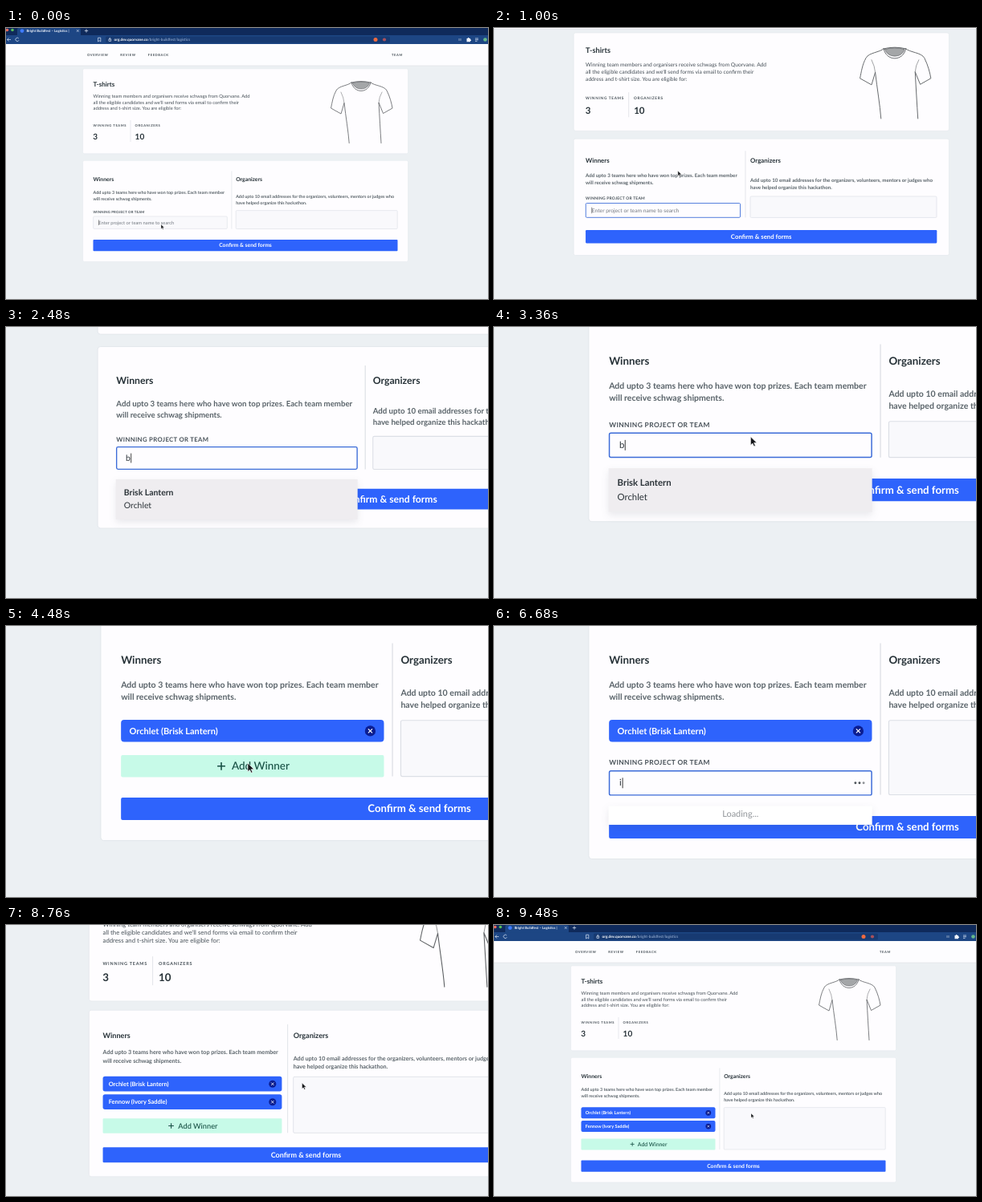
Write an HTML page that moves like this. It is 600x338 px and loops after 9520 ms.

```html
<!DOCTYPE html>
<html lang="en">
<head>
<meta charset="utf-8">
<title>Logistics form</title>
<style>
  html, body { margin: 0; width: 100%; height: 100%; overflow: hidden; background: #ecf0f3; }
  svg { display: block; width: 100vw; height: 100vh; }
  text { font-family: Lato, "Open Sans", sans-serif; font-size: 5.8px; fill: #465057; text-rendering: geometricPrecision; white-space: pre; }
  .title { font-size: 8px; font-weight: 700; fill: #273238; }
  .head { font-size: 6.8px; font-weight: 700; fill: #273238; }
  .count { font-size: 10px; font-weight: 700; fill: #273238; }
  .caps { font-size: 4.1px; font-weight: 700; letter-spacing: .6px; }
  .label { font-size: 4.3px; font-weight: 700; letter-spacing: .19px; }
  .note { font-size: 5.38px; font-weight: 700; fill: #596369; }
  .hint { fill: #737980; }
  .typed { fill: #2b3338; }
  .strong { font-weight: 700; fill: #2b3338; }
  .pill { font-size: 5.6px; font-weight: 700; fill: #fff; }
  .action { font-size: 6.75px; font-weight: 700; fill: #fff; text-anchor: middle; }
  .add { font-size: 6.9px; font-weight: 500; fill: #164f43; }
  .tab { font-size: 4.3px; font-weight: 700; fill: #eef3fb; }
  .url { font-size: 4.7px; fill: #a9bedd; }
  .url tspan { fill: #fff; font-weight: 700; }
  .card { fill: #fefdff; stroke: #e1e6ea; stroke-width: .5; }
  .rule { stroke: #dadde2; stroke-width: .6; }
  .blue { fill: #2e63fc; }
  .field { fill: #f9f9fc; stroke: #dcdfe6; stroke-width: .6; }
  .field.focus { fill: #fefdff; stroke: #3b6bd8; stroke-width: .75; }
  .panel { filter: drop-shadow(0 2px 2.5px rgba(40, 50, 70, .1)); }
  .icon { fill: none; stroke: #dfe9f8; stroke-width: .7; }
  .shirt { fill: #fefdff; stroke: #5c5f62; stroke-width: .8; stroke-linejoin: round; stroke-linecap: round; }
</style>
</head>
<body>
<svg viewBox="0 0 600 338" preserveAspectRatio="none">
<g id="camera">
  <rect width="600" height="345" fill="#ecf0f3"/>

  <!-- Browser bar -->
  <rect width="600" height="10" fill="#0f2a5b"/>
  <rect y="9" width="600" height="11" fill="#1d4684"/>
  <path d="M14 9.5V2q0-2 2-2H91q2 0 2 2V9.5Z" fill="#1d4684"/>
  <circle cx="1.5" cy="2.5" r="1.8" fill="#e8695c"/>
  <circle cx="8" cy="2.5" r="1.8" fill="#56c05a"/>
  <circle cx="20" cy="3.6" r="2.4" fill="#3f7cff"/>
  <text class="tab" x="25.5" y="5.1">Bright Buildfest – Logistics |</text>
  <path class="icon" d="M88 2.2l2.6 2.6m0-2.6l-2.6 2.6M97.8 3.5h4.4m-2.2-2.2v4.4"/>
  <rect x="124" y="10.5" width="354" height="8" rx="1.5" fill="#173a72"/>
  <path class="icon" d="M6 14.5H1.5l2-2m-2 2l2 2M15.8 13a2.2 2.2 0 1 0 .3 2.2M114.6 12.2h3.2v4.8l-1.6-1.3-1.6 1.3Z"/>
  <path class="icon" d="M128 14h2.6v2.4H128Zm.5 0v-1q.8-1.4 1.6 0v1"/>
  <text class="url" x="134.5" y="16.1"><tspan>org.dev.quorvane.co</tspan>/bright-buildfest/logistics</text>
  <circle cx="460" cy="14.5" r="2.5" fill="#ef6a3f"/>
  <circle cx="471" cy="14.5" r="2.1" fill="#a8505c"/>
  <rect x="563" y="13" width="4" height="3" fill="#52709f"/>
  <path d="M573.5 13h1.4v-1h1.5v1h1.6v1.5h1V16h-1v1.2h-4.5Z" fill="#eef3fb"/>
  <path class="icon" d="M584 13h4m-4 1.7h4m-4 1.7h2.5"/>
  <circle cx="596.5" cy="14.5" r="2.3" fill="#66ba8b"/>

  <!-- Navigation -->
  <rect y="20" width="600" height="27" fill="#fdfdff"/>
  <path class="rule" d="M0 47H600"/>
  <text class="caps" x="101" y="35.4">OVERVIEW</text>
  <text class="caps" x="142.3" y="35.4">REVIEW</text>
  <text class="caps" x="176.8" y="35.4">FEEDBACK</text>
  <text class="caps" x="480" y="35.4">TEAM</text>

  <!-- Summary card -->
  <rect class="card" x="95.6" y="50.8" width="405" height="106" rx="2"/>
  <text class="title" x="108.5" y="72.7">T-shirts</text>
  <text x="108.5" y="87">Winning team members and organisers receive schwags from Quorvane. Add</text>
  <text x="108.5" y="94.7">all the eligible candidates and we'll send forms via email to confirm their</text>
  <text x="108.5" y="102.4">address and t-shirt size. You are eligible for:</text>
  <text class="caps" x="108.5" y="123.1">WINNING TEAMS</text>
  <text class="caps" x="160.5" y="123.1">ORGANIZERS</text>
  <text class="count" x="108.3" y="138.5">3</text>
  <text class="count" x="160.6" y="138.5">10</text>
  <path class="rule" d="M155 115V142"/>
  <g class="shirt">
    <path d="M430 68C426 72 414 72 411 78C407 85 406 93 404.5 100L417 107L421 93.5C423 111 426 128 427.2 143.5M454 68C458 72 471 72 474 78C478 86 480 94 481 100L469.5 106.5L464 93C465 111 466 128 467 143.5"/>
    <path d="M417 80Q420.5 87 421 93.5M468 80Q464.5 86 464 93" stroke-width=".5" fill="none"/>
    <path d="M430 68C433 82 451 82 454 68"/>
    <path d="M431.5 68.6Q442 65.5 452.5 68.6C450 78.5 434 78.5 431.5 68.6Z" fill="#a4a6a8" stroke-width=".6"/>
    <path d="M430 68Q442 65 454 68" fill="none"/>
  </g>

  <!-- Form card -->
  <rect class="card" id="formCard" x="95.6" y="165.3" width="405" rx="2"/>
  <path class="rule" id="divider"/>
  <text class="head" x="108.5" y="191.4">Winners</text>
  <text class="note" x="108.5" y="206.7">Add upto 3 teams here who have won top prizes. Each team member</text>
  <text class="note" x="108.5" y="214.5">will receive schwag shipments.</text>
  <text class="head" x="286.2" y="191.4">Organizers</text>
  <text class="note" x="286.2" y="212">Add upto 10 email addresses for the organizers, volunteers, mentors or judges who</text>
  <text class="note" x="286.2" y="219.8">have helped organize this hackathon.</text>
  <rect class="field" id="emails" x="286.2" y="227.6" width="201" rx="1"/>

  <g id="confirm">
    <rect class="blue" x="108.5" width="379" height="14.3" rx="1"/>
    <text class="action" x="298" y="9.4">Confirm &amp; send forms</text>
  </g>

  <g id="pill1"></g>
  <g id="pill2" transform="translate(0 16.8)"></g>

  <g id="add">
    <rect x="108.5" y="249.7" width="167" height="14" rx="1" fill="#c7fae8"/>
    <path d="M169.7 256.7h5m-2.5-2.5v5" stroke="#164f43" stroke-width=".8"/>
    <text class="add" x="178.8" y="259">Add Winner</text>
  </g>

  <g id="search">
    <text class="label" x="108.5" y="231.1">WINNING PROJECT OR TEAM</text>
    <rect class="field" id="input" x="108.7" y="235" width="166.6" height="15.4" rx="1"/>
    <text class="hint" id="hint" x="115.2" y="244.6">Enter project or team name to search</text>
    <text class="typed" id="typed" x="115" y="244.6"></text>
    <rect id="caret" y="239.4" width=".5" height="6.6" fill="#333"/>
    <g id="loading">
      <rect class="panel" x="108.2" y="257.4" width="167.4" height="11.9" fill="#fff"/>
      <text x="192" y="264.2" text-anchor="middle" style="fill:#92969a;font-size:5.6px">Loading...</text>
      <g id="dots" fill="#444a50">
        <circle cx="265" cy="242.7" r=".75"/><circle cx="267.6" cy="242.7" r=".75"/><circle cx="270.2" cy="242.7" r=".75"/>
      </g>
    </g>
    <g id="result">
      <rect class="panel" x="108.2" y="257.4" width="167.4" height="27.8" fill="#efedf0"/>
      <text class="strong" id="team" x="113.8" y="268.6"></text>
      <text class="typed" id="project" x="113.8" y="277.5"></text>
    </g>
  </g>

  <path id="cursor" d="M0 0V5.4L1.3 4.3L2.2 6.2L3.1 5.8L2.2 3.9H4Z" fill="#15171a" stroke="#fff" stroke-width=".35"/>
</g>
</svg>
<script>
const LOOP = 9520;
const FOCUS = { x: 72.4, y: 342 };
const winners = [
  { team: "Brisk Lantern", project: "Orchlet", key: "b", typed: 1900, found: 2340, picked: 4040 },
  { team: "Ivory Saddle", project: "Fennow", key: "i", typed: 6600, found: 7040, picked: 7740 }
];
const ADD_CLICK = 4960;
const cursorPath = [
  [0, 193, 245], [250, 193, 245], [900, 208, 200], [3100, 208, 200], [3600, 190, 270],
  [4040, 190, 270], [4400, 189, 254.8], [5100, 189, 254.8], [5700, 186, 266],
  [7150, 186, 266], [7500, 190, 293], [7760, 190, 293], [8680, 294.3, 233.4],
  [8800, 294.3, 233.4], [9480, 320, 235]
];

const $ = id => document.getElementById(id);
const show = (id, on) => $(id).style.display = on ? "" : "none";
const move = (id, x, y) => $(id).setAttribute("transform", `translate(${x} ${y})`);
const clamp = u => Math.min(1, Math.max(0, u));
const smooth = u => u * u * (3 - 2 * u);

// Steady speed with soft ends; k is the share of time spent on each end.
function glide(t, start, end, k) {
  const u = clamp((t - start) / (end - start)), c = 2 * k * (1 - k);
  if (u < k) return u * u / c;
  if (u > 1 - k) return 1 - (1 - u) ** 2 / c;
  return (u - k / 2) / (1 - k);
}

function cursorAt(t) {
  const i = cursorPath.findIndex(p => p[0] > t);
  if (i < 0) return cursorPath.at(-1).slice(1);
  const [t0, x0, y0] = cursorPath[i - 1], [t1, x1, y1] = cursorPath[i];
  const u = smooth((t - t0) / (t1 - t0));
  return [x0 + (x1 - x0) * u, y0 + (y1 - y0) * u];
}

winners.forEach((w, i) => {
  $("pill" + (i + 1)).innerHTML = `
    <rect class="blue" x="108.5" y="227.2" width="167" height="14" rx="2"/>
    <text class="pill" x="113.8" y="236.2">${w.project} (${w.team})</text>
    <circle cx="266.8" cy="234.3" r="3.4" fill="#0b1d91"/>
    <path d="M265.5 233l2.6 2.6m0-2.6l-2.6 2.6" stroke="#fff" stroke-width=".6"/>`;
});

function drawSearch(t, entry, second) {
  const typed = t >= entry.typed, found = t >= entry.found;
  const focused = t >= (second ? 5900 : 120);
  move("search", 0, second ? 24.7 : 0);
  $("input").classList.toggle("focus", focused);
  show("hint", !typed);
  $("typed").textContent = typed ? entry.key : "";
  $("team").textContent = entry.team;
  $("project").textContent = entry.project;
  const since = typed ? t - entry.typed : t;
  show("caret", (focused || !second) && since % 1000 < 600);
  $("caret").setAttribute("x", !typed ? 115 : second ? 116.9 : 118.5);
  show("loading", typed && !found);
  show("result", found);
  [...$("dots").children].forEach((dot, i) =>
    dot.setAttribute("opacity", .6 + .4 * Math.cos((since - 80) / 160 - i * 1.1 + .6)));
}

function draw(t) {
  const zoom = 1 + .96 * (glide(t, 497, 3005, .12) - glide(t, 7963, 9263, .25));
  $("camera").setAttribute("transform",
    `translate(${FOCUS.x} ${FOCUS.y}) scale(${zoom}) translate(${-FOCUS.x} ${-FOCUS.y})`);

  const first = t >= winners[0].picked, second = t >= winners[1].picked;
  const adding = t >= ADD_CLICK && !second;
  const buttonY = second ? 293.5 : adding ? 288.4 : first ? 276.7 : 264;
  const columnEnd = buttonY - 13.5;
  $("formCard").setAttribute("height", buttonY + 27.4 - 165.3);
  $("divider").setAttribute("d", `M280.9 178.5V${columnEnd}`);
  $("emails").setAttribute("height", columnEnd - 227.6);
  move("confirm", 0, buttonY);
  show("pill1", first);
  show("pill2", second);
  show("add", first && !adding);
  move("add", 0, second ? 16.7 : 0);
  show("search", !first || adding);
  drawSearch(t, winners[first ? 1 : 0], first);

  move("cursor", ...cursorAt(t));
  show("cursor", !(t > 1800 && t < 3080) && !(t > 6560 && t < 7120));
}

function tick() {
  draw(performance.now() % LOOP);
  requestAnimationFrame(tick);
}
tick();
</script>
</body>
</html>
```
